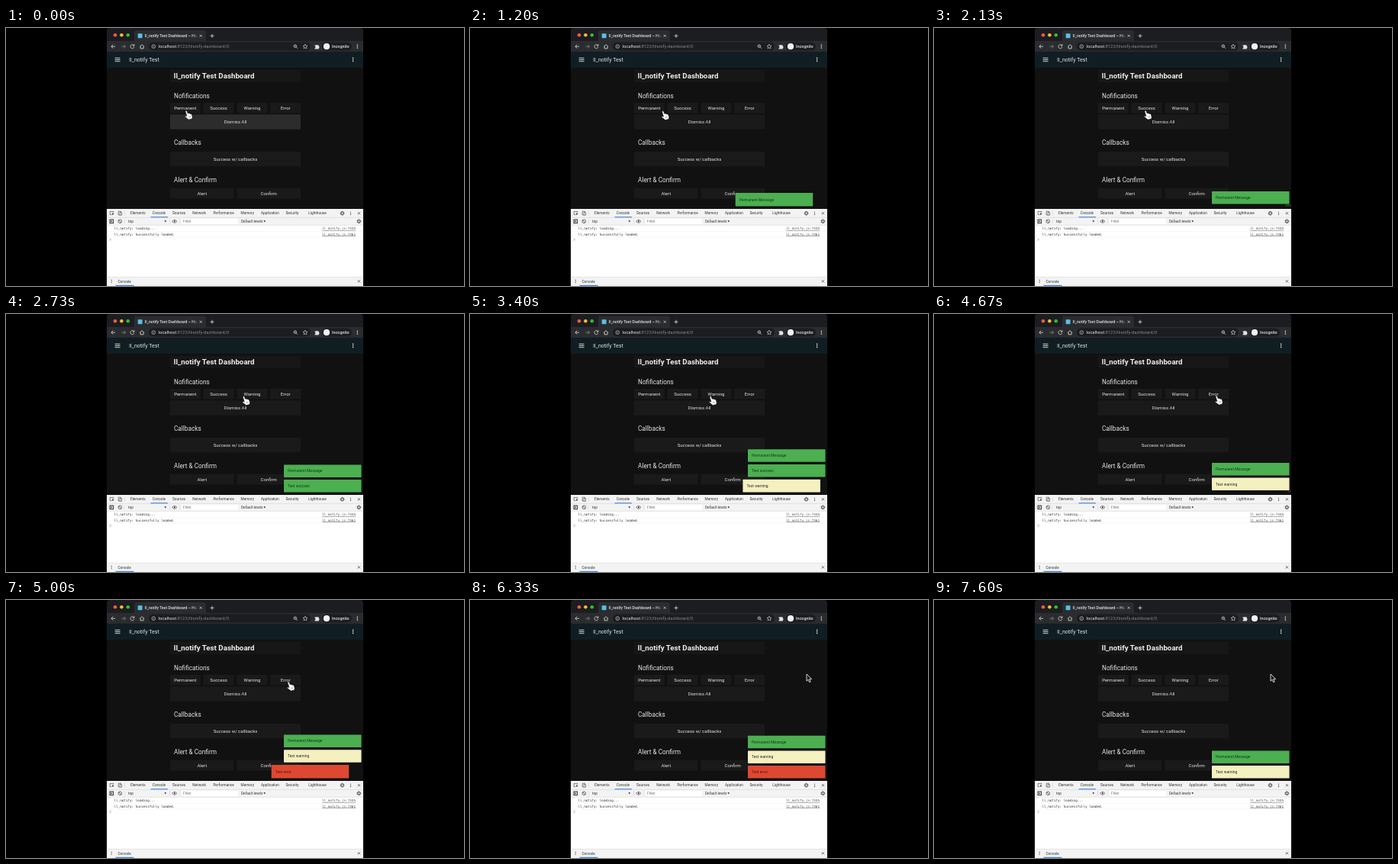
Animation, 600 px wide and 338 px high, one loop 8 s. Source, as an HTML page:

```html
<!DOCTYPE html>
<html lang="en">
<head>
<meta charset="utf-8">
<title>Notification dashboard</title>
<style>
  html, body { margin: 0; width: 100%; height: 100%; overflow: hidden; background: #000; }
  svg { display: block; width: 100vw; height: 100vh; }
  text { font-family: Roboto, sans-serif; white-space: pre; }
  .mono { font-family: "DejaVu Sans Mono", monospace; }
</style>
</head>
<body>
<svg id="stage" viewBox="0 0 600 338">
  <defs>
    <clipPath id="win"><path d="M132 338V4q0-4 4-4h328q4 0 4 4v334z"/></clipPath>
    <clipPath id="page"><path d="M132 31h336v206h-336z"/></clipPath>
    <linearGradient id="fade">
      <stop offset="0" stop-color="#2b2c2f" stop-opacity="0"/>
      <stop offset="1" stop-color="#2b2c2f"/>
    </linearGradient>
  </defs>
  <g clip-path="url(#win)">
    <g id="browser"></g>
    <g id="view"></g>
    <g id="toasts" clip-path="url(#page)"></g>
    <g id="tools"></g>
  </g>
  <g id="hand" fill="#fff" stroke="#111" stroke-width=".5" stroke-linejoin="round">
    <path d="M-.9 .9C-1.2-.3 .7-.8 1.1 .4L2.2 3.5C2.8 2.9 3.7 3 4 3.7 4.7 3.2 5.5 3.5 5.7 4.2 6.5 3.9 7.1 4.3 7.3 5L8 7.4C8.3 8.6 7.9 9.5 7.5 10.4L3.2 11.6C2.2 10.5 .4 9.5-1 8.3-2.1 7.3-1.1 6.2 .1 6.8L1 7.3z"/>
    <path d="M3.4 7l.8 2.4M5 6.5l.8 2.4" fill="none" stroke-width=".35"/>
  </g>
  <path id="arrow" d="M0 0v9.2l2.1-2 1.5 3.5 1.6-.7-1.5-3.4h2.9z" fill="#111" stroke="#fff" stroke-width=".8"/>
</svg>
<script>
const LOOP = 8000;
const INK = '#e4e4e4', DIM = '#85878b', DARK = '#333';
const STRIP = '#1c1d20', CHROME = '#2b2c2f', CARD = '#1a1a1a', HOVER = '#2c2c2c';
const $ = id => document.getElementById(id);

function add(parent, tag, attrs, content) {
  const el = document.createElementNS('http://www.w3.org/2000/svg', tag);
  for (const k in attrs) el.setAttribute(k, attrs[k]);
  if (content !== undefined) el.textContent = content;
  parent.appendChild(el);
  return el;
}
const rect = (p, x, y, width, height, fill, rx = 0) => add(p, 'rect', { x, y, width, height, fill, rx });
const text = (p, x, y, str, size, fill, more = {}) =>
  add(p, 'text', { x, y, 'font-size': size, fill, ...more }, str);
const line = (p, d, stroke, width = .8) =>
  add(p, 'path', { d, stroke, fill: 'none', 'stroke-width': width });
const dot = (p, cx, cy, r, fill) => add(p, 'circle', { cx, cy, r, fill });
const ring = (p, cx, cy, r, stroke, width = .8) =>
  add(p, 'circle', { cx, cy, r, stroke, fill: 'none', 'stroke-width': width });
const kebab = (p, x, y, fill, r = .7, gap = 2) =>
  [-gap, 0, gap].forEach(d => dot(p, x, y + d, r, fill));
const cross = (p, x, y, r, color) =>
  line(p, `M${x - r} ${y - r}l${2 * r} ${2 * r}m0 ${-2 * r}l${-2 * r} ${2 * r}`, color, .7);
const caret = (p, x, y) => add(p, 'path', { d: `M${x - 1.4} ${y - .9}h2.8l-1.4 2.2z`, fill: DARK });
function gear(p, x, y) {
  ring(p, x, y, 1.7, DARK, 1);
  add(p, 'circle', { cx: x, cy: y, r: 2.5, fill: 'none', stroke: DARK, 'stroke-width': .8, 'stroke-dasharray': '1 .96' });
}

function drawBrowser() {
  const g = $('browser');
  rect(g, 132, 0, 336, 31, STRIP);
  rect(g, 168, 3, 94, 18, CHROME, 3);
  rect(g, 132, 17, 336, 14, CHROME);
  ['#f45a4e', '#f5b935', '#35b944'].forEach((c, i) => dot(g, 143 + i * 8.4, 9.3, 2.3, c));
  rect(g, 172.7, 7.3, 5.9, 5.9, '#58bfe8', 1);
  text(g, 182, 12.2, 'll_notify Test Dashboard – Ho', 5.15, INK, { 'font-weight': 500 });
  rect(g, 244, 6, 8, 9, 'url(#fade)');
  cross(g, 255.2, 10.3, 1.5, INK);
  line(g, 'M267.5 10.3h5m-2.5-2.5v5', INK);

  line(g, 'M143 24.2h-5m2.3-2.4l-2.4 2.4 2.4 2.4', INK);
  line(g, 'M151.4 24.2h5m-2.3-2.4l2.4 2.4-2.4 2.4', DIM);
  line(g, 'M167.4 22.6a2.5 2.5 0 1 0 .5 2.4m.1-3.6v2h-2', INK);
  line(g, 'M175.2 24.4l2.9-2.6 2.9 2.6m-4.9-.5v3h4v-3', INK);
  rect(g, 187, 18.6, 212, 11, STRIP, 5.5);
  ring(g, 193.3, 24.2, 2.3, INK, .6);
  line(g, 'M193.3 23.8v1.7m0-2.9v.6', INK, .6);
  const url = text(g, 199.5, 26.2, '', 5.8, INK);
  add(url, 'tspan', {}, 'localhost');
  add(url, 'tspan', { fill: DIM }, ':8123/llnotify-dashboard/0');
  ring(g, 378.8, 23.7, 1.8, INK, .7);
  line(g, 'M380.2 25.1l1.7 1.7m-4-3.1h1.8', INK, .7);
  line(g, 'M392 21.2l.9 2 2.1.2-1.6 1.4.5 2.1-1.9-1.1-1.9 1.1.5-2.1-1.6-1.4 2.1-.2z', INK, .6);
  add(g, 'path', { d: 'M404.6 22.6h1.5a1.2 1.2 0 0 1 2.2 0h1.5v1.5a1.2 1.2 0 0 1 0 2.2v1.3h-5.2v-1.5a1 1 0 0 0 0-2z', fill: INK });
  rect(g, 414, 18.6, 39, 11, STRIP, 5.5);
  dot(g, 420, 24.2, 4.1, '#f2f2f2');
  text(g, 427, 26.1, 'Incognito', 5.4, INK, { 'font-weight': 500 });
  kebab(g, 460.3, 24.2, INK);
}

let hoverCard;
function drawView() {
  const g = $('view');
  rect(g, 132, 31, 336, 206, '#111');
  rect(g, 132, 31, 336, 21, '#101e24');
  line(g, 'M142.7 39.3h6.8m-6.8 2.2h6.8m-6.8 2.2h6.8', INK, .9);
  text(g, 161.3, 44, 'll_notify Test', 7.06, INK);
  kebab(g, 454.6, 41.5, INK, .8, 2.1);

  const button = (x, y, w, h, label) => {
    const box = rect(g, x, y, w, h, CARD, 1);
    text(g, x + w / 2, y + h / 2 + 2.1, label, 6, INK, { 'text-anchor': 'middle' });
    return box;
  };
  const heading = (y, label) => text(g, 220, y, label, 8.25, INK);

  rect(g, 215, 55, 171, 16, '#171717', 1);
  text(g, 219.8, 66.3, 'll_notify Test Dashboard', 9.75, '#eee', { 'font-weight': 700 });
  heading(91.6, 'Nofifications');
  ['Permanent', 'Success', 'Warning', 'Error']
    .forEach((s, i) => button(214.8 + i * 43.8, 98, 40, 13.6, s));
  hoverCard = button(215, 113.3, 171, 19.5, 'Dismiss All');
  heading(153.2, 'Callbacks');
  button(215, 162, 171, 19.2, 'Success w/ callbacks');
  heading(201.8, 'Alert & Confirm');
  button(215, 209.8, 83.5, 13.6, 'Alert');
  button(302.5, 209.8, 83.5, 13.6, 'Confirm');
}

function drawTools() {
  const g = $('tools'), bar = '#f3f3f3', rule = '#ccc', blue = '#3c82e0';
  rect(g, 132, 237, 336, 101, '#fff');
  rect(g, 132, 237, 336, 21.3, bar);
  line(g, 'M132 248.3h336M132 258.3h336', rule, .5);

  line(g, 'M138.5 244.6h-2.3v-4.2h4.6v1.8', DARK, .6);
  add(g, 'path', { d: 'M138.6 242.3l3.2 1.2-1.3.6-.6 1.4z', fill: DARK });
  line(g, 'M147.2 240.2h3.4v1m-3.4-1v4.8h1.6m.4-3.4h2.4v3.6h-2.4z', DARK, .6);
  line(g, 'M155.5 239.5v6.5', rule, .5);
  const tabs = { Elements: 163, Console: 191.8, Sources: 218, Network: 244.2, Performance: 271.4,
    Memory: 307.5, Application: 334, Security: 366.5, Lighthouse: 396.3 };
  for (const name in tabs) text(g, tabs[name], 244.3, name, 4.75, DARK);
  rect(g, 189.5, 247.2, 22.5, 1.1, blue);
  gear(g, 440.5, 242.7);
  kebab(g, 451.5, 242.7, DARK, .55, 1.7);
  cross(g, 462.4, 242.7, 1.6, DARK);

  rect(g, 136, 251, 4.6, 4.6, 'none').setAttribute('stroke', DARK);
  add(g, 'path', { d: 'M137.3 251.9l2.3 1.4-2.3 1.4z', fill: DARK });
  ring(g, 149.3, 253.3, 2.3, DARK, .7);
  line(g, 'M147.7 251.7l3.2 3.2', DARK, .7);
  line(g, 'M155 250v6.6M214.5 250v6.6M228 250v6.6', rule, .5);
  text(g, 160, 255, 'top', 4.75, DARK);
  caret(g, 208.8, 253.2);
  line(g, 'M217.6 253.3q3.2-3.8 6.4 0q-3.2 3.8-6.4 0z', DARK, .6);
  dot(g, 220.8, 253.3, 1, DARK);
  rect(g, 229.5, 249.8, 74.5, 7.2, '#fff');
  text(g, 232, 255, 'Filter', 4.75, '#777');
  text(g, 308, 255, 'Default levels', 4.75, DARK);
  caret(g, 338.8, 253.2);
  gear(g, 462.3, 253.3);

  const log = (y, msg, from) => {
    text(g, 141.5, y, msg, 4.27, '#262626', { class: 'mono' });
    text(g, 458, y, from, 4.3, '#444', { class: 'mono', 'text-anchor': 'end', 'text-decoration': 'underline' });
    line(g, `M132 ${y + 2.4}h336`, '#f0f0f0', .5);
  };
  log(264, 'll_notify: loading...', 'll_notify.js:7335');
  log(271.5, 'll_notify: Successfully loaded.', 'll_notify.js:7361');
  line(g, 'M135.8 275.8l1.5 1.5-1.5 1.5', blue, .7);

  rect(g, 132, 326.3, 336, 11.7, bar);
  line(g, 'M132 326.3h336', rule, .5);
  kebab(g, 138.2, 331.8, DARK, .55, 1.7);
  text(g, 146.5, 333.5, 'Console', 4.75, DARK);
  rect(g, 143.5, 336.8, 24, 1.2, blue);
  cross(g, 462.4, 331.8, 1.6, DARK);
}

// Newest last; the stack grows upwards from the bottom edge.
const GREEN = { fill: '#4caf50', ink: '#113d18' };
const toasts = [
  { label: 'Permanent Message', ...GREEN, start: 780 },
  { label: 'Test success', ...GREEN, start: 2030, end: 4070 },
  { label: 'Test warning', fill: '#f5f0c0', ink: '#262626', start: 2930 },
  { label: 'Test error', fill: '#de4832', ink: '#5c1309', start: 4580, end: 6630 }
];
function buildToasts() {
  for (const t of toasts) {
    t.g = add($('toasts'), 'g', {});
    t.box = rect(t.g, 364, 0, 101.5, 16.5, t.fill, .6);
    t.text = text(t.g, 369, 0, t.label, 4.95, t.ink);
  }
}

const clamp = v => Math.max(0, Math.min(1, v));
const smooth = v => (v = clamp(v), v * v * (3 - 2 * v));

// Eased interpolation through [time, ...values] rows.
function track(keys, t) {
  let i = 0;
  while (i < keys.length - 2 && t >= keys[i + 1][0]) i++;
  const a = keys[i], b = keys[i + 1], k = smooth((t - a[0]) / (b[0] - a[0]));
  return a.slice(1).map((v, n) => v + (b[n + 1] - v) * k);
}

// phase, x offset, relative height
const bounceIn = [[0, 115, 0], [.6, -16.3, 1.06], [.75, 4, .98], [.9, -2, 1], [1, 0, 1]];
const ENTER = 700, LEAVE = 600;

const pointer = [[0, 236, 108.5], [980, 236, 108.5], [1420, 269, 109.5], [1800, 277, 108.5], [2400, 277, 108.5],
  [2760, 312, 108], [2900, 315, 108], [4000, 315, 108], [4450, 370, 107.5],
  [5500, 370, 107.5], [5870, 441, 97], [LOOP, 441, 97]];

function render(t) {
  let y = 233.6;
  for (const o of [...toasts].reverse()) {
    const age = t - o.start, gone = t - (o.end || Infinity);
    const on = age >= 0 && gone < LEAVE;
    o.g.setAttribute('display', on ? 'inline' : 'none');
    if (!on) continue;
    let [x, grow] = track(bounceIn, clamp(age / ENTER));
    let alpha = clamp(age / (ENTER * .5));
    if (gone > 0) {
      x = 85 * (gone / 200) ** 2;
      grow = 1 - smooth(gone / LEAVE);
      alpha = clamp(1 - gone / 400);
    }
    const h = 16.5 * grow;
    y -= h;
    o.g.setAttribute('transform', `translate(${x} ${y})`);
    o.g.setAttribute('opacity', alpha);
    o.box.setAttribute('height', h);
    o.text.setAttribute('y', h / 2 + 1.7);
    y -= 3.2 * grow;
  }

  hoverCard.setAttribute('fill', t < 140 ? HOVER : CARD);

  const [px, py] = track(pointer, t), overButton = px < 386;
  const shown = $(overButton ? 'hand' : 'arrow'), hidden = $(overButton ? 'arrow' : 'hand');
  shown.setAttribute('display', 'inline');
  shown.setAttribute('transform', `translate(${px} ${py})`);
  hidden.setAttribute('display', 'none');
}

drawBrowser();
drawView();
drawTools();
buildToasts();

const begin = performance.now();
function tick() {
  render((performance.now() - begin) % LOOP);
  requestAnimationFrame(tick);
}
tick();
</script>
</body>
</html>
```
